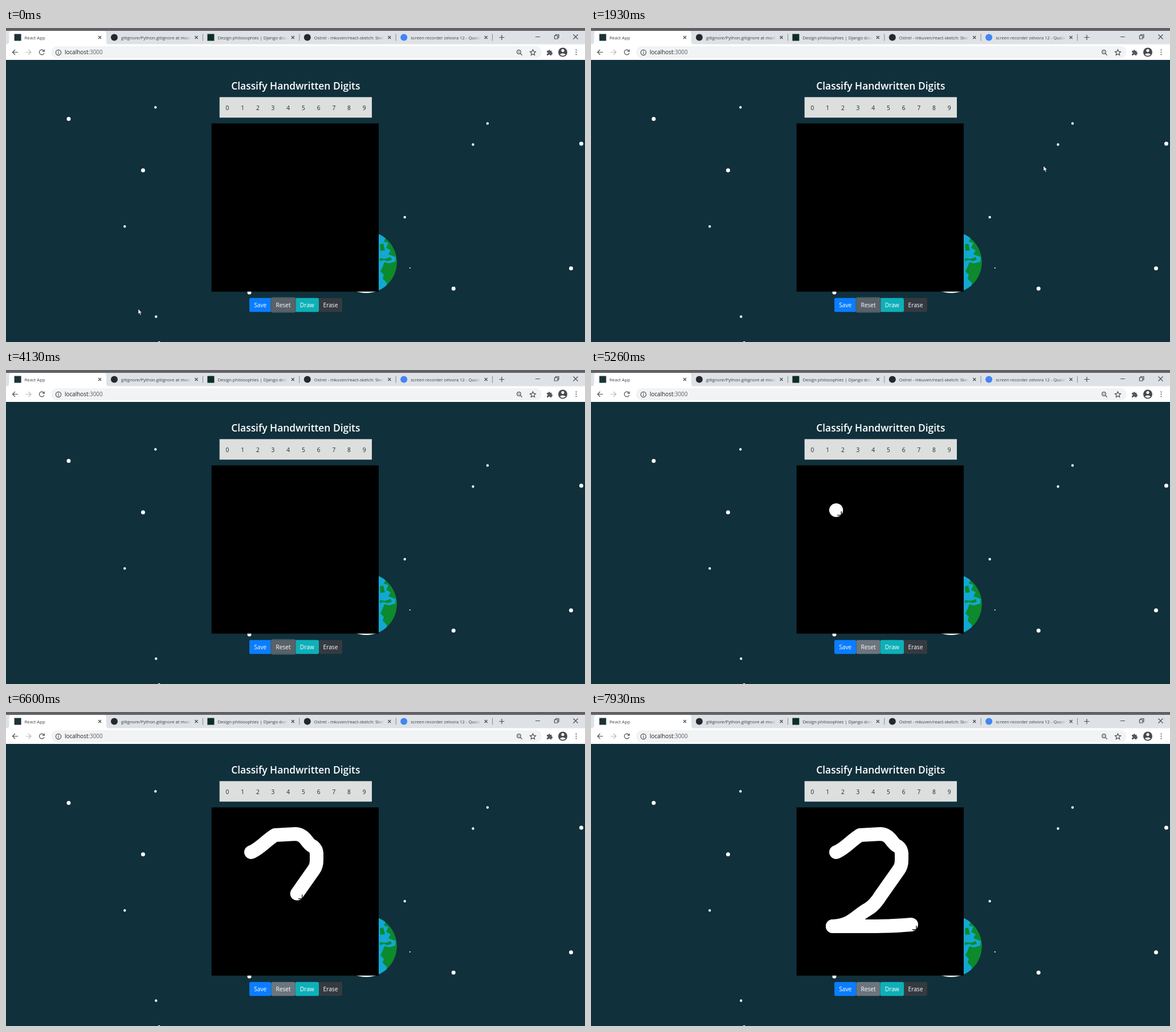
Animation of 1016x551 px, one loop 8000 ms. Source, as an HTML page:

```html
<!DOCTYPE html>
<html lang="en">
<head>
<meta charset="utf-8">
<title>Classify Handwritten Digits</title>
<style>
  html, body { margin: 0; height: 100%; overflow: hidden; background: #10303b; }
  svg { display: block; width: 100vw; height: 100vh; font-family: "Open Sans", "Noto Sans", sans-serif; }
  .line { fill: none; stroke: #4a4d51; stroke-width: 1.2; }
  .tab { font-size: 7.7px; fill: #3c4043; }
  .mid { text-anchor: middle; }
  .stars, #ink { fill: none; stroke: #fff; stroke-linecap: round; stroke-linejoin: round; }
</style>
</head>
<body>
<svg viewBox="0 0 1016 551">
  <defs>
    <linearGradient id="fade">
      <stop offset="0" stop-color="#dee1e6" stop-opacity="0"/>
      <stop offset="1" stop-color="#dee1e6"/>
    </linearGradient>
    <clipPath id="globe"><circle cx="632" cy="411" r="54"/></clipPath>
  </defs>
  <rect width="1016" height="551" fill="#10303b"/>

  <!-- Browser frame -->
  <rect width="1016" height="5" fill="#606065"/>
  <rect y="5" width="1016" height="24" fill="#dee1e6"/>
  <path d="M0 29Q5.500 29 5.500 23V10Q5.500 5 10.500 5H171Q176 5 176 10V23Q176 29 181 29Z" fill="#fff"/>
  <rect y="28.500" width="1016" height="27.500" fill="#fff"/>
  <rect x="79" y="32" width="861" height="21" rx="10.500" fill="#f1f3f4"/>
  <g id="tabs"></g>
  <path class="line" d="M865.500 16.500h9M870 12v9M929 15.500h8"/>
  <path class="line" d="M962.500 13.500h5.500v5.500h-5.500zM964.500 13.500v-2h5.500v5.500h-2M995.500 11.500l8 8m0-8l-8 8"/>
  <path class="line" d="M21 42.500H12M16 38l-4.500 4.500L16 47M66.300 39.800A4.400 4.400 0 1 0 67 44M67.300 37.800v3.400h-3.400"/>
  <path class="line" d="M34.500 42.500H43.500M39.500 38l4.500 4.500L39.500 47" style="stroke:#b9bbbe"/>
  <g class="line">
    <circle cx="92" cy="43" r="4.600"/><path d="M92 42.300v3.200M92 40v1.200"/>
    <circle cx="900" cy="42" r="3.300"/><path d="M902.500 44.500l3.300 3.300M898.500 42h3"/>
    <path d="M924.500 38l1.500 3.200 3.500.4-2.600 2.400.7 3.500-3.100-1.800-3.100 1.800.7-3.500-2.600-2.400 3.500-.4z"/>
  </g>
  <path d="M949 40h2.500a1.700 1.700 0 1 1 3.400 0h2.600v2.700a1.700 1.700 0 1 1 0 3.400V48h-2.700a1.600 1.600 0 0 0-3.200 0H949v-2.500a1.600 1.600 0 0 0 0-3.200z" fill="#55585c"/>
  <circle cx="977" cy="42.500" r="8" fill="#45484c"/>
  <circle cx="977" cy="39.500" r="2.600" fill="#fff"/>
  <path d="M971.800 46.500q5.200-4 10.400 0q-5.200 4.500-10.400 0" fill="#fff"/>
  <path d="M1000.500 38.500h0m0 4h0m0 4h0" stroke="#4a4d51" stroke-width="2" stroke-linecap="round"/>
  <text x="103" y="46.300" font-size="9.900" fill="#202124">localhost<tspan fill="#5f6368">:3000</tspan></text>

  <!-- Page -->
  <path class="stars" stroke-width="7" d="M110 159.500h0M1009.500 203h0M240.500 249.700h0M991.500 421.800h0M785.300 457.300h0M427 464h0"/>
  <path class="stars" stroke-width="4.400" d="M262.300 139.300h0M845 167.500h0M819.500 204.500h0M208.300 348.300h0M699.700 332h0M263.300 506.500h0M268.700 552h0"/>
  <path class="stars" stroke-width="2.200" d="M708.800 421h0"/>
  <g clip-path="url(#globe)">
    <circle cx="632" cy="411" r="54" fill="#0c8a2c"/>
    <path d="M650 355L667 366 663 375 671 377 667 386 675 390 671 397 684 402 683 410 672 413 664 411 661 419 657 427 663 433 661 440 668 447 668 455 650 465Z" fill="#12a8d2"/>
    <path d="M656 380l6-2 3 12-8 1zM656 404l10 1 9-3 2 5-8 2-6-2-7 2z" fill="#0c8a2c"/>
    <ellipse cx="632" cy="464" rx="20" ry="4" fill="#fff"/>
  </g>
  <text x="508.300" y="107.800" class="mid" font-size="17.400" font-weight="600" fill="#fff">Classify Handwritten Digits</text>
  <rect x="374.700" y="121.300" width="267.300" height="36" fill="#dcdfde"/>
  <g id="digits" class="mid" font-size="10.200" fill="#212529"></g>
  <rect x="360.700" y="167.400" width="293.300" height="295.200"/>
  <g id="buttons" class="mid" font-size="10.200"></g>
  <g id="ink" stroke-width="24"></g>
  <path id="cross" d="M-7 0H7M0-7V7" stroke="#000" stroke-width="1.300"/>
  <path id="arrow" d="M0 0V9L2 7.200 3.600 10.800 5.200 10.100 3.700 6.700H6.500Z" fill="#fff" stroke="#0a1a20" stroke-width=".6"/>
</svg>
<script>
const $ = id => document.getElementById(id);
const fill = (id, items, draw) => $(id).innerHTML = items.map(draw).join('');
const show = (el, on) => el.setAttribute('visibility', on ? 'visible' : 'hidden');

fill('tabs', [
  ['React App', '#1d3238', 0],
  ['gitignore/Python.gitignore at master', '#24292f', 6],
  ['Design philosophies | Django docume', '#0c2e24', 0],
  ['Ostrel - mkuven/react-sketch: Sketch', '#24292f', 6],
  ['screen recorder zelvora 12 - Quoden', '#4285f4', 6]
], ([label, color, radius], i) => `<g transform="translate(${6.6 + i * 169.4})">
  <rect x="8" y="10.5" width="12" height="12" rx="${radius}" fill="${color}"/>
  <text x="26" y="19.5" class="tab">${label}</text>
  ${i ? `<rect x="136" y="8" width="12.5" height="18" fill="url(#fade)"/>
  <rect x="148" y="8" width="21" height="18" fill="#dee1e6"/>
  <path d="M169.400 10.500v12" stroke="#85888d"/>` : ''}
  <path class="line" d="M155.500 14l5 5m0-5l-5 5"/></g>`);

fill('digits', [...'0123456789'], (d, i) => `<text x="${388.4 + i * 26.7}" y="144">${d}</text>`);

let left = 427;
fill('buttons', [
  ['Save', 38.5, '#0a7dff'], ['Reset', 42, '#6c757d'], ['Draw', 41.5, '#0eb0b8'], ['Erase', 41, '#343a40']
], ([label, width, color]) => {
  const x = left;
  left += width;
  return `<rect x="${x}" y="473.700" width="${width}" height="24.600" rx="2.500" fill="${color}"/>
    <text x="${x + width / 2}" y="490" fill="#fff">${label}</text>`;
});
const resetBox = $('buttons').children[2];
$('buttons').append(resetBox, resetBox.nextElementSibling);
resetBox.setAttribute('stroke-width', 2.5);

// The digit is drawn in three strokes with pauses between them
const strokes = [
  { start: 5260, end: 5930, d: 'M430 246C444 241 457 225 472 216L508 214C528 216 527 232 539 236Q545 241 545 249' },
  { start: 6260, end: 7060, d: 'M545 249V260Q545 270 540 277L509 321Q498 339 486 346C464 358 458 374 424 376' },
  { start: 7400, end: 7730, d: 'M424 376H490Q530 376 562 373' }
];
fill('ink', strokes, s => `<path d="${s.d}" pathLength="1"/>`);
strokes.forEach((s, i) => s.path = $('ink').children[i]);

const moves = [
  { start: 60, end: 400, x: 174, y: 514 },
  { start: 800, end: 1200, x: 923, y: 237 },
  { start: 1660, end: 2460, x: 439, y: 256 }
];
const progress = ({ start, end }, t) => Math.min(1, Math.max(0, (t - start) / (end - start)));
const ease = u => u * u * (3 - 2 * u);

function frame(now) {
  const t = now % 8000;
  const pressed = t >= 4800;
  let x = 232, y = 493;
  for (const move of moves) {
    const u = ease(progress(move, t));
    x += (move.x - x) * u;
    y += (move.y - y) * u;
  }
  strokes.forEach(({ path, ...span }, i) => {
    const on = pressed && (i === 0 || t >= span.start);
    const u = progress(span, t);
    show(path, on);
    path.setAttribute('stroke-dasharray', `${u} 2`);
    if (on) {
      const tip = path.getPointAtLength(u * path.getTotalLength());
      [x, y] = [tip.x + 9, tip.y + 9];
    }
  });
  const onCanvas = x > 360 && x < 654 && y > 167 && y < 463;
  show($('cross'), onCanvas);
  show($('arrow'), !onCanvas);
  for (const id of ['cross', 'arrow']) $(id).setAttribute('transform', `translate(${x} ${y})`);
  resetBox.setAttribute('fill', pressed ? '#6c757d' : '#5a6268');
  resetBox.setAttribute('stroke', pressed ? 'none' : '#4d5f68');
  requestAnimationFrame(frame);
}
requestAnimationFrame(frame);
</script>
</body>
</html>
```
